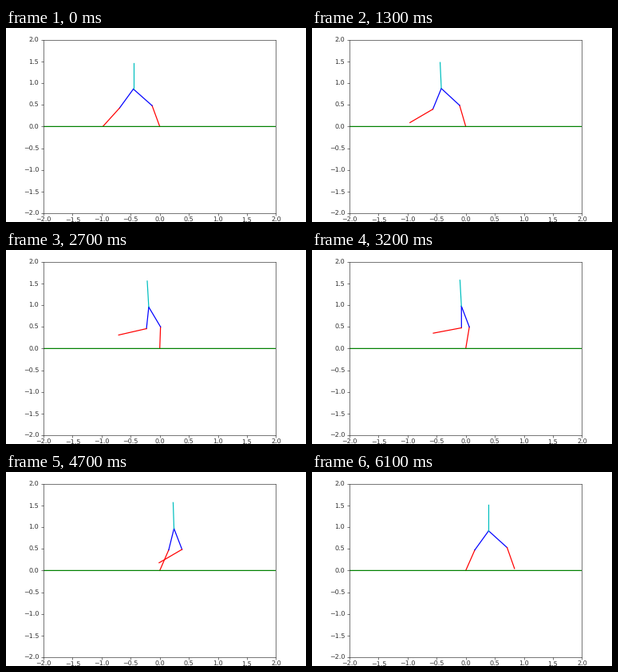
Recreate the animation shown at these times as a matplotlib script. Size 376 by 243 pixels, loop 6200 ms.

```python
import numpy as np
import matplotlib.pyplot as plt
from matplotlib.animation import FuncAnimation

W, H, DPI = 376, 243, 58.75
FRAMES, STEP = 62, 100
END = (FRAMES - 1) * STEP / 1000
LIMB, TORSO = 0.5, 0.6
INK = "0.2"

plt.rcParams.update({
    "text.hinting": "none", "text.hinting_factor": 1,
    "axes.edgecolor": INK, "xtick.color": INK, "ytick.color": INK,
    "xtick.major.pad": 3,
})


def ease(t, start=0, length=END):
    u = np.clip((t - start) / length, 0, 1)
    return u * u * (3 - 2 * u)


def hump(s, skew):
    """Rise and fall over the step; a skew above 1 peaks late."""
    return np.sin(np.pi * s ** skew)


def pose(t):
    """Angles in degrees from the vertical, positive to the right."""
    s = t / END
    stance_shin = -15.3 + 33.5 * ease(t, 0.47, 4.45)
    stance_thigh = -40.1 + 71.5 * ease(t, 0.85, 6)
    swing_thigh = -28.5 + 54 * s + 14 * s ** 6
    swing_shin = -34 + 48.7 * ease(t) - 72 * hump(s, 1.45)
    torso = -2.5 * hump(s, 0.8)
    return stance_shin, stance_thigh, swing_thigh, swing_shin, torso


def joints(t):
    up = [np.array([np.sin(r), np.cos(r)]) for r in np.radians(pose(t))]
    down = np.array([1, -1])
    foot = np.zeros(2)
    knee = foot + LIMB * up[0]
    hip = knee + LIMB * up[1]
    swing_knee = hip + LIMB * up[2] * down
    swing_foot = swing_knee + LIMB * up[3] * down
    head = hip + TORSO * up[4]
    return foot, knee, hip, swing_knee, swing_foot, head


# The small margin keeps the pixel size from rounding down
fig = plt.figure(figsize=((W + 0.01) / DPI, (H + 0.01) / DPI), dpi=DPI, facecolor="white")
ax = fig.add_axes([0.125, 11.02 / H, 0.775, 217.14 / H])
ticks = np.arange(-2, 2.1, 0.5)
ax.set(xlim=(-2, 2), ylim=(-2, 2), xticks=ticks, yticks=ticks)

limbs = [ax.plot([], [], color=c, lw=1.5)[0] for c in "rbbrc"]
ax.plot([-2, 2], [0, 0], color="g", lw=1.5, snap=False)


def draw(frame):
    foot, knee, hip, swing_knee, swing_foot, head = joints(frame * STEP / 1000)
    bones = [(foot, knee), (knee, hip), (hip, swing_knee),
             (swing_knee, swing_foot), (hip, head)]
    for line, (p, q) in zip(limbs, bones):
        line.set_data([p[0], q[0]], [p[1], q[1]])
    return limbs


anim = FuncAnimation(fig, draw, frames=FRAMES, interval=STEP, repeat=True, repeat_delay=0)
plt.show()
```
